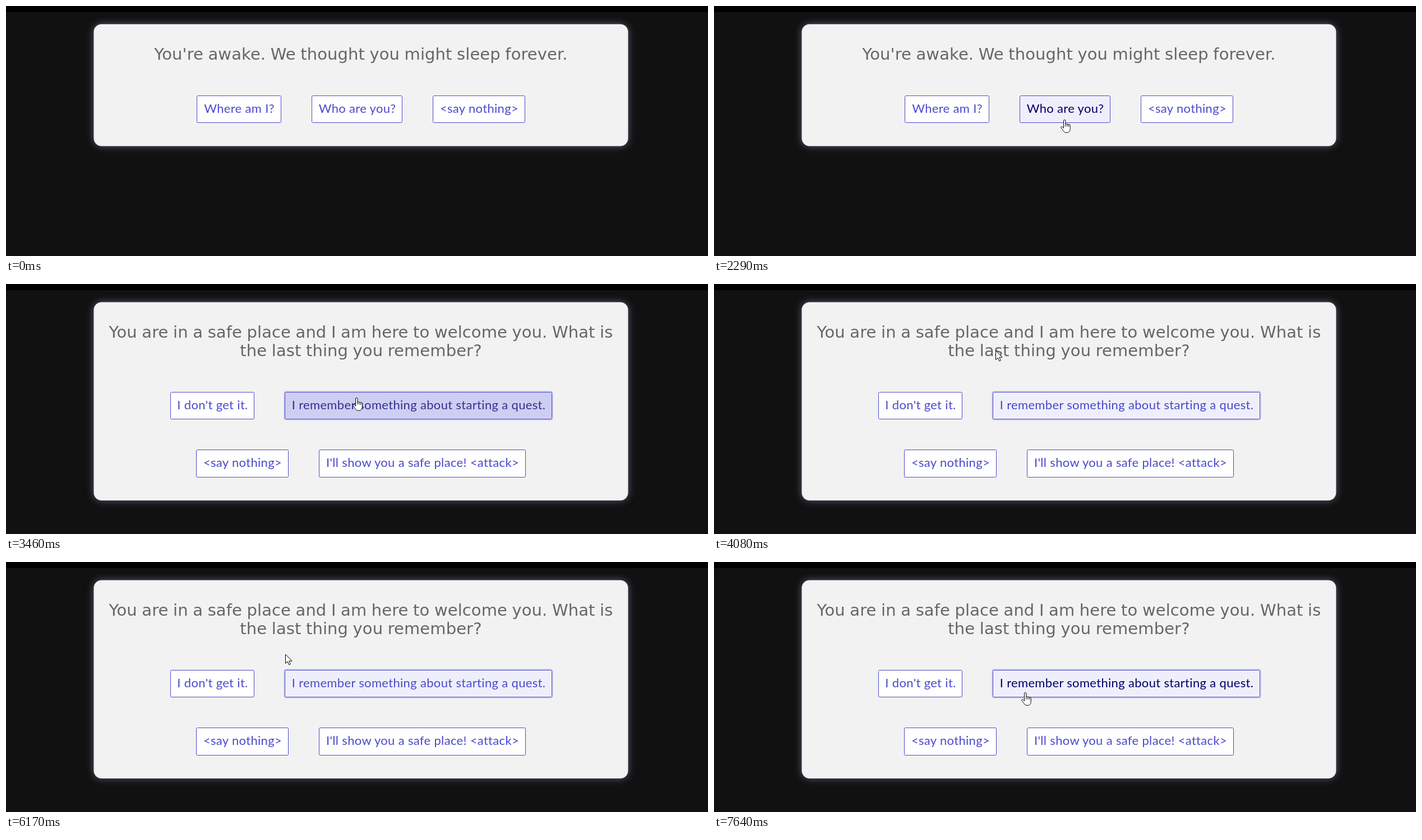
Recreate the animation shown at these times as an HTML page. Size 1252 by 447 pixels, loop 8000 ms.

```html
<!DOCTYPE html>
<html lang="en">
<head>
<meta charset="utf-8">
<title>Dialogue</title>
<style>
  html, body { margin: 0; width: 100%; height: 100%; overflow: hidden; background: #111; }
  svg { display: block; width: 1252px; height: 447px; }
  .card { fill: #f2f2f2; filter: drop-shadow(0 0 7px #5a5a76); }
  .title { font: 29px "DejaVu Sans", "Open Sans", sans-serif; letter-spacing: .1px; word-spacing: -.8px; fill: #666; text-anchor: middle; }
  .label { font: 22px Lato, "Open Sans", sans-serif; letter-spacing: .33px; fill: #4a4acd; text-anchor: middle; }
  .box { fill: #fff; stroke: #4a4acd; }
  .ring { fill: none; stroke: #cfcfee; stroke-width: 3; }
  .cursor { fill: #fff; stroke: #000; stroke-linejoin: round; stroke-linecap: round; }
</style>
</head>
<body>
<svg id="stage" viewBox="0 0 1252 447">
  <rect width="1252" height="447" fill="#111"/>
  <rect width="1252" height="11" fill="#000"/>
</svg>
<script>
const LOOP = 8000, STEP = 77.2, LEAD = 128;
const CENTER = 633, GAP = 54.5;
const stage = document.getElementById('stage');

function add(parent, tag, attrs, text) {
  const node = document.createElementNS('http://www.w3.org/2000/svg', tag);
  for (const name in attrs) node.setAttribute(name, attrs[name]);
  if (text) node.textContent = text;
  return parent.appendChild(node);
}

function button(parent, x, y, w, h, text) {
  const ring = add(parent, 'rect', { class: 'ring', x: x - 1, y: y - 1, width: w + 2, height: h + 2, rx: 3, opacity: 0 });
  const box = add(parent, 'rect', { class: 'box', x, y, width: w, height: h, rx: 2 });
  const label = add(parent, 'text', { class: 'label', x: x + w / 2 + .5, y: y + 30.5 }, text);
  const contains = (px, py) => px >= x && px <= x + w && py >= y && py <= y + h;
  return { ring, box, label, contains };
}

// A centred row of buttons, given as [text, width] pairs.
function row(parent, y, h, items) {
  const total = items.reduce((sum, item) => sum + item[1], GAP * (items.length - 1));
  let x = CENTER - total / 2;
  return items.map(([text, w]) => {
    const b = button(parent, Math.floor(x) + .5, y, Math.floor(w), h, text);
    x += w + GAP;
    return b;
  });
}

function scene(height, lines) {
  const group = add(stage, 'g', {});
  add(group, 'rect', { class: 'card', x: 156.5, y: 32.5, width: 953, height, rx: 14 });
  lines.forEach((line, i) => add(group, 'text', { class: 'title', x: CENTER, y: 96 + 33 * i }, line));
  return group;
}

const first = scene(218, ["You're awake. We thought you might sleep forever."]);
const question = row(first, 160.5, 48, [['Where am I?', 150.5], ['Who are you?', 161], ['<say nothing>', 164.5]])[1];

const second = scene(354.5, [
  'You are in a safe place and I am here to welcome you. What is',
  'the last thing you remember?'
]);
const answer = row(second, 193.5, 48, [["I don't get it.", 149.5], ['I remember something about starting a quest.', 476]])[1];
row(second, 296.5, 49, [['<say nothing>', 164.5], ["I'll show you a safe place! <attack>", 368]]);

const arrow = add(stage, 'path', { class: 'cursor', d: 'M.5 .5V16.3L4.2 13L6.8 18.8L9.3 17.7L6.8 12H11.8Z' });
const hand = add(stage, 'path', {
  class: 'cursor',
  d: 'M5.5 15V2.2a1.7 1.7 0 0 1 3.4 0V8.5a1.6 1.6 0 0 1 3 .3a1.5 1.5 0 0 1 2.8 .7a1.4 1.4 0 0 1 2.6 .8' +
     'V16.5c0 4-2 6.8-5.5 6.8h-1.8c-2.6 0-4-1.4-5.3-3.6L.9 14.6c-.9-1.7 1.2-2.9 2.4-1.5z' +
     'M8.9 8.5V12.3M11.9 8.8V12.3M14.7 9.5V12.6'
});

const clamp = v => Math.max(0, Math.min(1, v));
const linear = p => p;
const easeOut = p => 1 - (1 - p) ** 2;
const smooth = p => p * p * (3 - 2 * p);
const ramp = (t, from, length) => clamp((t - from) / length);
const mix = (a, b, p) => a.map((v, i) => v + (b[i] - v) * p);

// Each sweep is a Bézier curve that starts where the previous one ends.
const ENTRY = [1010, 434];
const sweeps = [
  { from: 128, to: 905, ease: linear, curve: [[700, 400], [385, 340], [514, 307]] },
  { from: 905, to: 2290, ease: easeOut, curve: [[561, 252], [598, 218], [625, 203]] },
  { from: 3840, to: 4680, ease: easeOut, curve: [[540, 110], [430, 90], [410, 123]] },
  { from: 5000, to: 5840, ease: smooth, curve: [[460, 103], [619, 130], [552, 153]] },
  { from: 5840, to: 6770, ease: smooth, curve: [[470, 157], [435, 218], [470, 212]] },
  { from: 6770, to: 7616, ease: linear, curve: [[480, 245], [508, 252], [555, 233]] }
];

function bezier(points, u) {
  while (points.length > 1) points = points.slice(1).map((p, i) => mix(points[i], p, u));
  return points[0];
}

function pointer(t) {
  let at = ENTRY;
  for (const { from, to, ease, curve } of sweeps) {
    if (t < from) break;
    at = bezier([at, ...curve], ease(ramp(t, from, to - from)));
  }
  return at.map(Math.round);
}

const WHITE = [255, 255, 255], PALE = [239, 239, 251], PRESSED = [125, 124, 224];
const BLUE = [74, 74, 205], NAVY = [0, 0, 106], FADED = [172, 170, 228];
const FADE = 230, CLICK = 3216, SWAP = 3440;

const rgb = c => `rgb(${c.map(Math.round)})`;
const show = (node, on) => { node.style.display = on ? '' : 'none'; };

function paint(b, t) {
  const hover = ramp(t, 1760, FADE) - ramp(t, 3840, FADE) + ramp(t, 7385, FADE);
  const press = ramp(t, CLICK, 154) - ramp(t, SWAP - 60, 95);
  const focus = ramp(t, CLICK, SWAP - CLICK);
  b.box.style.fill = rgb(mix(mix(WHITE, PALE, Math.max(hover, focus)), PRESSED, press));
  b.label.style.fill = rgb(mix(mix(BLUE, NAVY, hover), FADED, press));
  b.ring.setAttribute('opacity', focus);
}

function draw(time) {
  const t = LEAD + Math.floor((time - LEAD) / STEP) * STEP;
  const later = t >= SWAP;
  const active = later ? answer : question;
  const [x, y] = pointer(t);
  const over = active.contains(x, y);

  show(first, !later);
  show(second, later);
  paint(active, t);
  show(arrow, t >= LEAD && !over);
  show(hand, over);
  arrow.setAttribute('transform', `translate(${x} ${y})`);
  hand.setAttribute('transform', `translate(${x - 7} ${y})`);
}

const start = performance.now();
function tick() {
  draw((performance.now() - start) % LOOP);
  requestAnimationFrame(tick);
}
tick();
</script>
</body>
</html>
```
